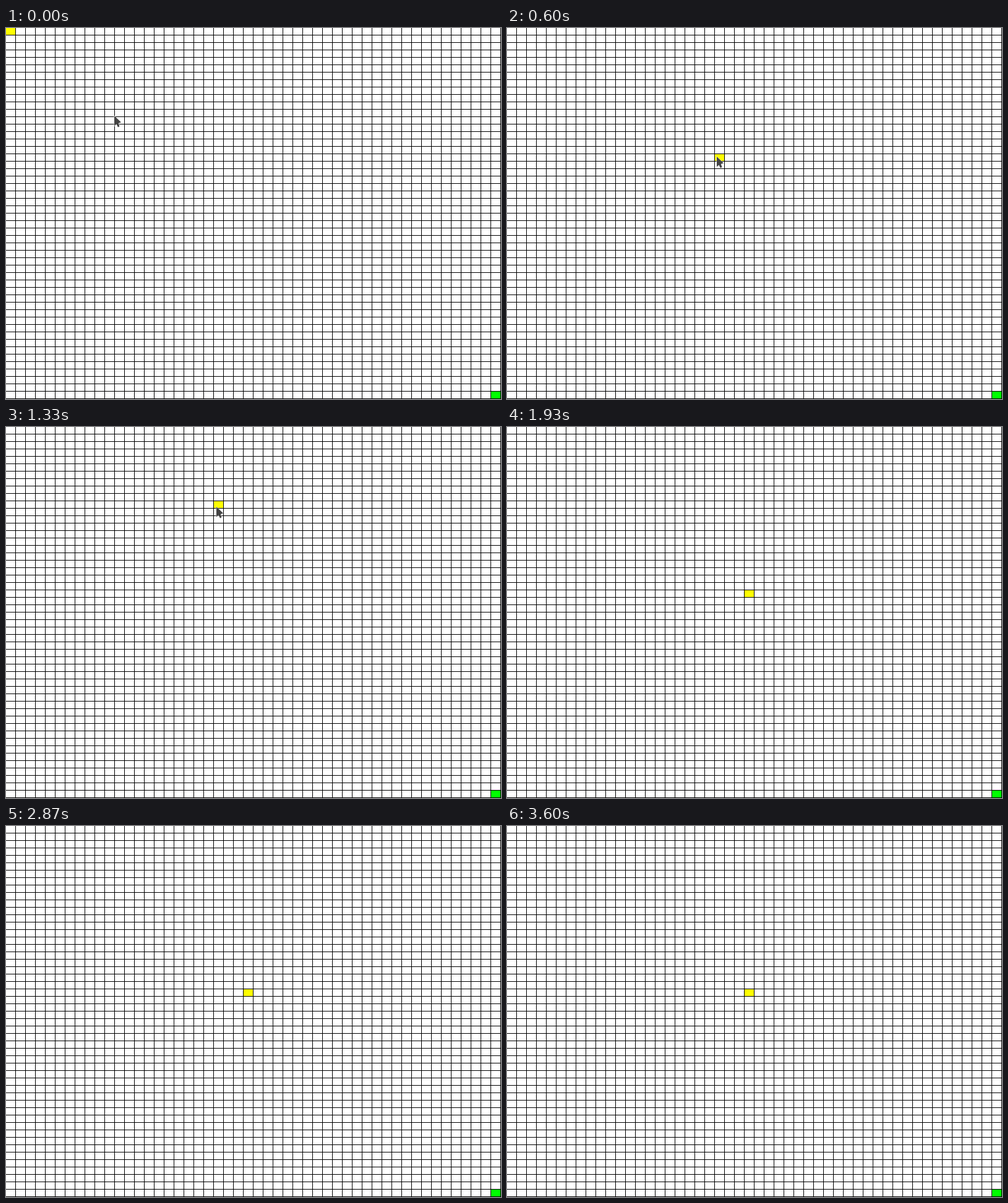
Recreate the animation shown at these times as an HTML page with a canvas. Size 800 by 600 pixels, loop 3670 ms.

```html
<!DOCTYPE html>
<html lang="en">
<head>
<meta charset="utf-8">
<title>Grid pointer</title>
<style>
  html, body { margin: 0; width: 100%; height: 100%; overflow: hidden; background: #fff; }
  canvas { display: block; }
</style>
</head>
<body>
<canvas id="stage" width="800" height="600"></canvas>
<script>
const ctx = document.getElementById('stage').getContext('2d');
const LOOP = 3670, CELL_W = 16, CELL_H = 12, HIDE_AT = 1860;

// Pointer path: time, x, y
const path = [
  [0, 175, 142],
  [70, 178, 143],
  [600, 339, 208],
  [1330, 340, 129],
  [1800, 391, 269]
];

const arrow = new Path2D('M0 0V16.5L3.5 13.5L6 18.5L8.5 17L6.8 12L11 10.5Z');

const ease = p => p * p * (3 - 2 * p);

function pointerAt(t) {
  const i = path.findIndex(p => p[0] > t);
  if (i < 0) return path[path.length - 1].slice(1);
  const [t0, x0, y0] = path[i - 1], [t1, x1, y1] = path[i];
  const p = ease((t - t0) / (t1 - t0));
  return [Math.round(x0 + (x1 - x0) * p), Math.round(y0 + (y1 - y0) * p)];
}

// Three steps every 200 ms: 70, 60 and 70 ms long
function snap(t) {
  const r = t % 200;
  return t - r + (r >= 130 ? 130 : r >= 70 ? 70 : 0);
}

function fillCell(col, row, color) {
  ctx.fillStyle = color;
  ctx.fillRect(col * CELL_W, row * CELL_H, CELL_W - 1, CELL_H - 1);
}

function drawGrid() {
  ctx.fillStyle = '#fff';
  ctx.fillRect(0, 0, 800, 600);
  ctx.fillStyle = '#000';
  for (let x = CELL_W - 1; x < 800; x += CELL_W) ctx.fillRect(x, 0, 1, 600);
  for (let y = CELL_H - 1; y < 600; y += CELL_H) ctx.fillRect(0, y, 800, 1);
}

function drawPointer(x, y) {
  ctx.save();
  ctx.translate(x, y);
  ctx.strokeStyle = '#fff';
  ctx.lineWidth = 1;
  ctx.stroke(arrow);
  ctx.fillStyle = '#444';
  ctx.fill(arrow);
  ctx.restore();
}

function draw(t) {
  const [x, y] = pointerAt(t);
  drawGrid();
  fillCell(49, 49, '#0f0');
  // The highlight waits in the corner until the pointer moves
  if (t === 0) fillCell(0, 0, '#ff0');
  else fillCell(Math.floor(x / CELL_W), Math.floor(y / CELL_H), '#ff0');
  if (t < HIDE_AT) drawPointer(x, y);
}

const start = performance.now();
function tick() {
  draw(snap((performance.now() - start) % LOOP));
  requestAnimationFrame(tick);
}
tick();
</script>
</body>
</html>
```
